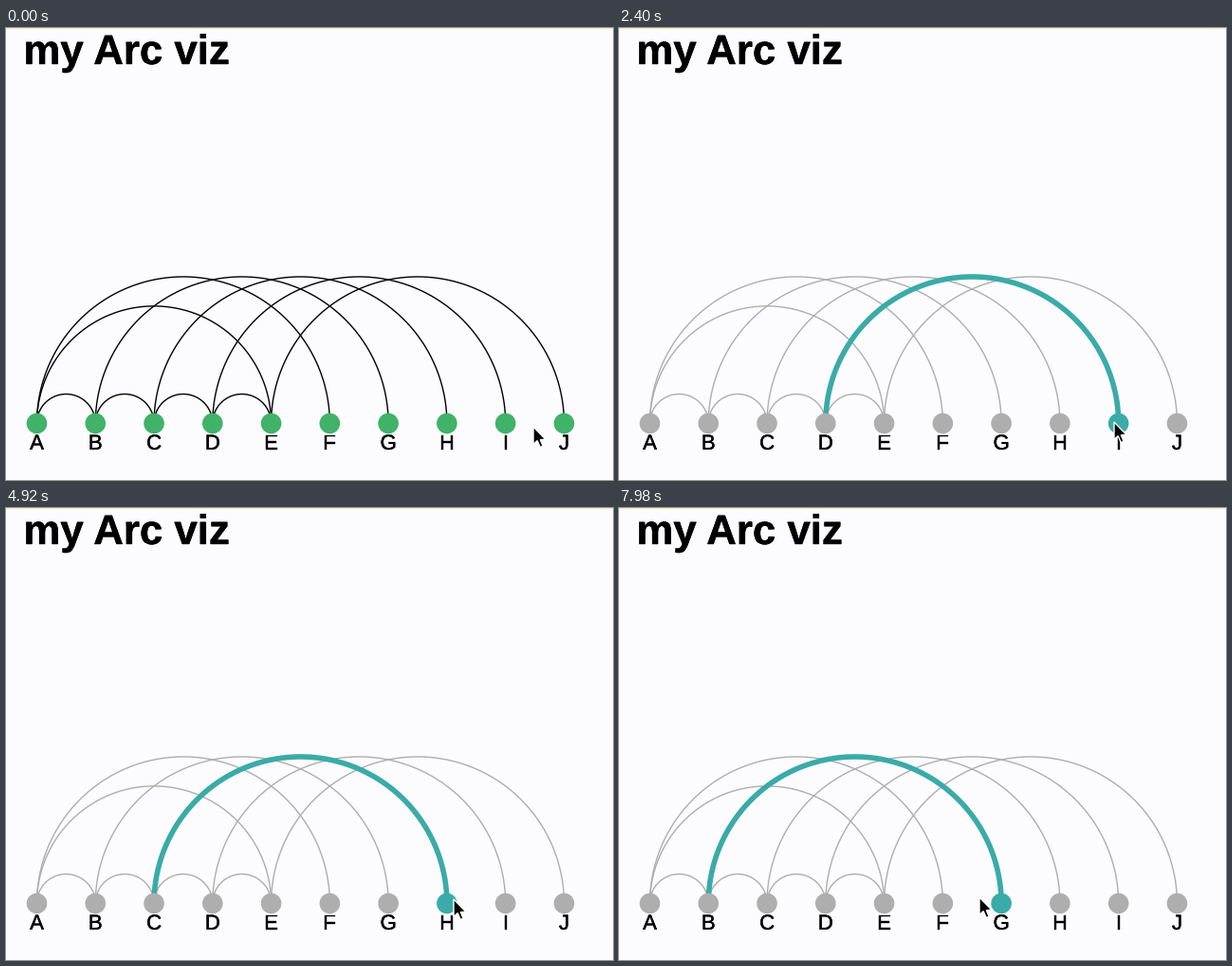
Animation, 640 px wide and 476 px high, one loop 8000 ms. Source, as a matplotlib script:

```python
import math
import numpy as np
import matplotlib.pyplot as plt
from matplotlib import patheffects
from matplotlib.animation import FuncAnimation
from matplotlib.patches import Circle, Polygon, Rectangle

W, H, DPI = 640, 476, 100
LOOP, STEP = 8000, 20
PT = 72 / DPI  # points per pixel

BACK, GREEN, TEAL, GREY = "#fcfcfe", "#40b368", "#3aaba8", "#aeaeae"
NODES = "ABCDEFGHIJ"
X0, GAP, BASE, RADIUS = 32.5, 61.77, 416.4, 10.8

# neighbours among the first five, five-step links, and one long link
LINKS = ([NODES[i:i + 2] for i in range(4)]
         + [NODES[i] + NODES[i + 5] for i in range(5)] + ["AE"])

# the pointer rests, then glides to the next stop: start ms, x, y
START = (556, 420)
STOPS = [(1440, 522, 415), (3540, 502, 412), (4640, 472, 412),
         (6270, 400, 413), (7850, 380, 410)]
GLIDE = 120
LAG = 140  # delay between entering a node and its highlight


def node_x(name):
    return X0 + GAP * NODES.index(name)


def smooth(u):
    u = min(max(u, 0), 1)
    return u * u * (3 - 2 * u)


def pointer(ms):
    x, y = START
    for t, tx, ty in STOPS:
        s = smooth((ms - t) / GLIDE)
        x, y = x + (tx - x) * s, y + (ty - y) * s
    return x, y


def hovered(ms):
    x, y = pointer(ms - LAG)
    return next((n for n in NODES
                 if math.hypot(x - node_x(n), y - BASE) < RADIUS), None)


def label(x, y, text, px, bold=0.4, **style):
    ax.text(x, y, text, size=px * PT, family="Liberation Sans",
            color="black", zorder=5, **style,
            path_effects=[patheffects.withStroke(linewidth=bold * PT,
                                                 foreground="black")])


fig = plt.figure(figsize=(W / DPI, H / DPI), dpi=DPI, facecolor=BACK)
ax = fig.add_axes([0, 0, 1, 1])
ax.set_xlim(0, W)
ax.set_ylim(H, 0)
ax.axis("off")

ax.add_patch(Rectangle((0, 0), W, 1, color="#ecebc6", lw=0))
label(18.4, 38, "my Arc viz", 43.8, weight="bold")

angle = np.linspace(0, np.pi, 120)
arcs = {}
for link in LINKS:
    a, b = map(node_x, link)
    r = (b - a) / 2
    arcs[link], = ax.plot((a + b) / 2 - r * np.cos(angle),
                          BASE - r * np.sin(angle),
                          solid_capstyle="butt")

dots = {}
for name in NODES:
    dots[name] = ax.add_patch(
        Circle((node_x(name), BASE), RADIUS, lw=0, zorder=4))
    label(node_x(name), 443.8, name, 22.2, ha="center")

ARROW = np.array([(0, 0), (0, 18.5), (4.2, 14.6), (7.2, 21.5),
                  (10.2, 20.2), (7.3, 13.6), (13, 13.2)])
arrow = ax.add_patch(Polygon(ARROW, facecolor="black", edgecolor="white",
                             lw=1.4 * PT, joinstyle="miter", zorder=6))


def draw(i):
    ms = i * STEP
    active = hovered(ms)
    for link, arc in arcs.items():
        on = active is not None and active in link
        arc.set_color(TEAL if on else GREY if active else "black")
        arc.set_linewidth((5.6 if on else 1.4) * PT)
        arc.set_zorder(3 if on else 2)
    for name, dot in dots.items():
        dot.set_facecolor(GREEN if active is None
                          else TEAL if name == active else GREY)
    arrow.set_xy(ARROW + pointer(ms))
    return [*arcs.values(), *dots.values(), arrow]


anim = FuncAnimation(fig, draw, frames=LOOP // STEP, interval=STEP,
                     repeat=True, repeat_delay=0)
plt.show()
```
